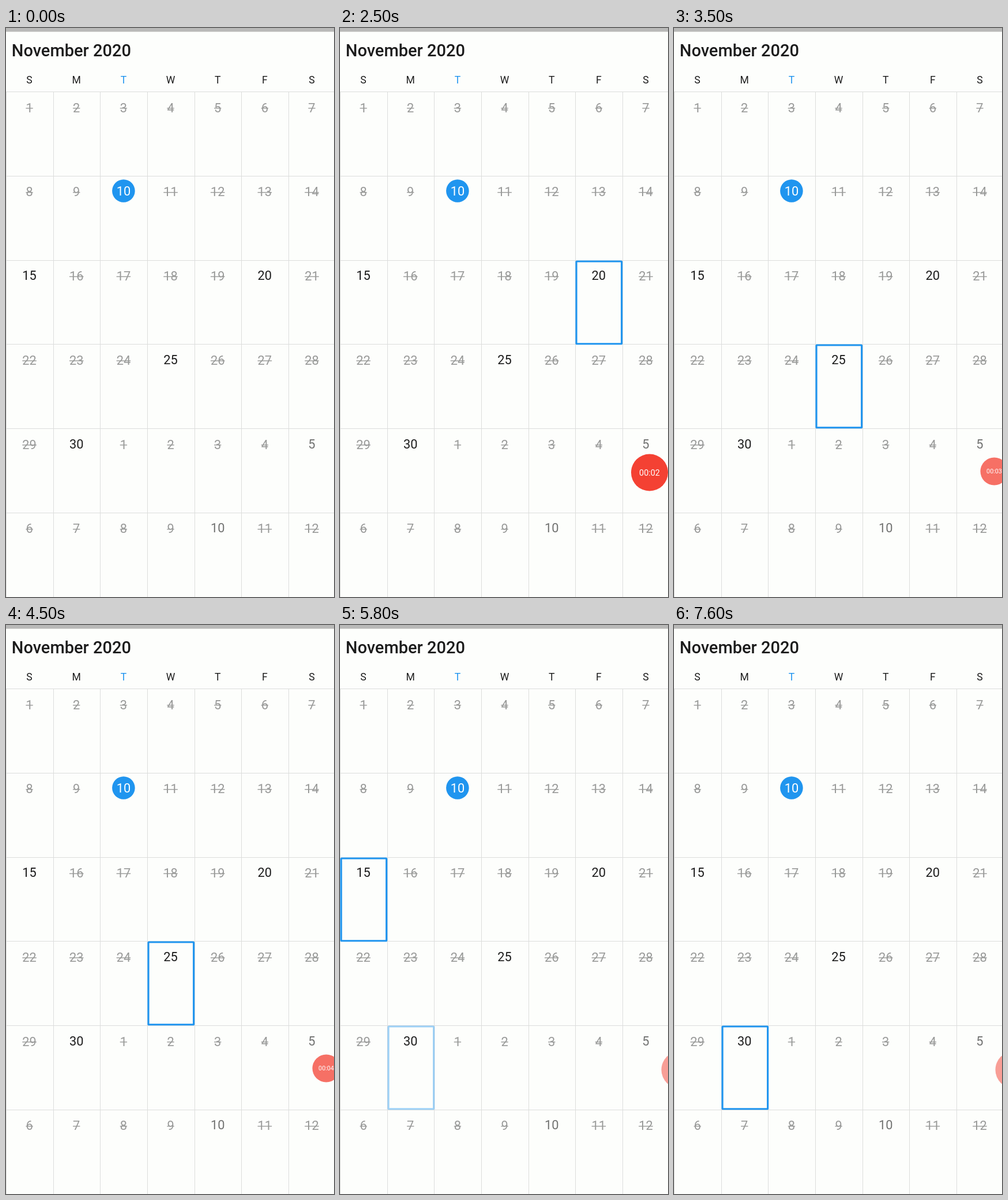
These frames come from a looping animation (569x985 px, 8 s). An HTML page:

```html
<!DOCTYPE html>
<html lang="en">
<head>
<meta charset="utf-8">
<title>Calendar</title>
<style>
  html, body { margin: 0; width: 100%; height: 100%; overflow: hidden; background: #fdfefc; }
  svg { display: block; width: 569px; height: 985px; font-family: Roboto, Arial, sans-serif; }
  text { text-anchor: middle; }
</style>
</head>
<body>
<svg id="stage" viewBox="0 0 569 985"></svg>
<script>
const LOOP = 8000;
const COL = 81.65, ROW = 145.75, TOP = 110.5;
const BLUE = '#2095ef', LINE = '#dcdddc', DARK = '#1c1c1c';
const stage = document.getElementById('stage');

function add(tag, attrs, content, parent = stage) {
  const el = document.createElementNS('http://www.w3.org/2000/svg', tag);
  for (const key in attrs) el.setAttribute(key, attrs[key]);
  if (content !== undefined) el.textContent = content;
  parent.appendChild(el);
  return el;
}

const colX = c => Math.round(c * COL);
const rowY = r => Math.round(TOP + r * ROW - 0.5);
const midX = c => 40.6 + c * COL;

// Header and grid
add('rect', { width: 569, height: 6.5, fill: '#b9b9b8' });
add('text', { x: 9.8, y: 49, 'font-size': 29, 'font-weight': 500, fill: DARK,
  style: 'text-anchor:start' }, 'November 2020');
[...'SMTWTFS'].forEach((name, c) => add('text', {
  x: midX(c), y: 95.8, 'font-size': 17.6, fill: c === 2 ? BLUE : DARK }, name));
for (let r = 0; r < 7; r++)
  add('rect', { x: 0, y: rowY(r), width: 569, height: 1, fill: LINE });
for (let c = 0; c < 7; c++)
  add('rect', { x: colX(c), y: 110, width: 1, height: 875, fill: LINE });

// Days: from the 10th on, every fifth one is open
for (let i = 0; i < 42; i++) {
  const n = i + 1, x = midX(i % 7), y = TOP + Math.floor(i / 7) * ROW + 34;
  const day = n > 30 ? n - 30 : n;
  const today = n === 10, open = n >= 10 && n % 5 === 0;
  if (today) add('circle', { cx: x, cy: 282, r: 19.8, fill: BLUE });
  const fill = today ? '#fff' : !open ? '#999a99' : n > 30 ? '#717271' : DARK;
  add('text', { x, y: open ? y : y + 1, 'font-size': 21.8, fill }, day);
  if (!open) {
    const w = String(day).length * 12.3;
    add('rect', { x: x - w / 2, y: y - 6.3, width: w, height: 1.4, fill });
  }
}

// Selected cells: [column, row, time]
const picks = [[5, 2, 1750], [3, 3, 3450], [0, 2, 4950], [1, 4, 5850]].map(([c, r, at]) => ({
  at: at - 100,
  el: add('rect', {
    x: colX(c) + 2, y: rowY(r) + 2, width: COL - 3, height: ROW - 3,
    rx: 1, fill: 'none', stroke: BLUE, 'stroke-width': 3.2 })
}));

// Recorder bubble
const bubble = add('g', {});
add('circle', { r: 32, fill: '#f44133' }, undefined, bubble);
const clock = add('text', { y: 5.2, 'font-size': 14.4, fill: '#fff' }, '00:00', bubble);

// [time, x, y, scale, opacity]
const path = [
  [700, 537, 769.5, 1, 1],
  [2550, 537, 769.5, 1, 1],
  [3150, 555.5, 767.5, 0.75, 0.75],
  [5200, 555.5, 767.5, 0.75, 0.75],
  [5650, 589.5, 770, 1, 0.5],
  [LOOP, 589.5, 770, 1, 0.5]
];
const clamp = v => Math.max(0, Math.min(1, v));

function pose(t) {
  const i = Math.max(1, path.findIndex(p => t < p[0]));
  const a = path[i - 1], b = path[i], k = clamp((t - a[0]) / (b[0] - a[0]));
  return a.map((v, j) => v + (b[j] - v) * k);
}

function draw(t) {
  picks.forEach(({ at, el }, i) => {
    const next = picks[i + 1];
    const gone = next && t >= next.at + 120;
    el.setAttribute('opacity', gone ? 0 : clamp((t - at) / 120));
  });
  const [, x, y, s, o] = pose(t);
  bubble.setAttribute('transform', `translate(${x} ${y}) scale(${s})`);
  bubble.setAttribute('opacity', t < 700 ? 0 : o);
  const sec = Math.max(0, Math.floor((t - 500) / 1000));
  clock.textContent = '00:0' + sec;
}

const start = performance.now();
function tick() {
  draw((performance.now() - start) % LOOP);
  requestAnimationFrame(tick);
}
tick();
</script>
</body>
</html>
```
